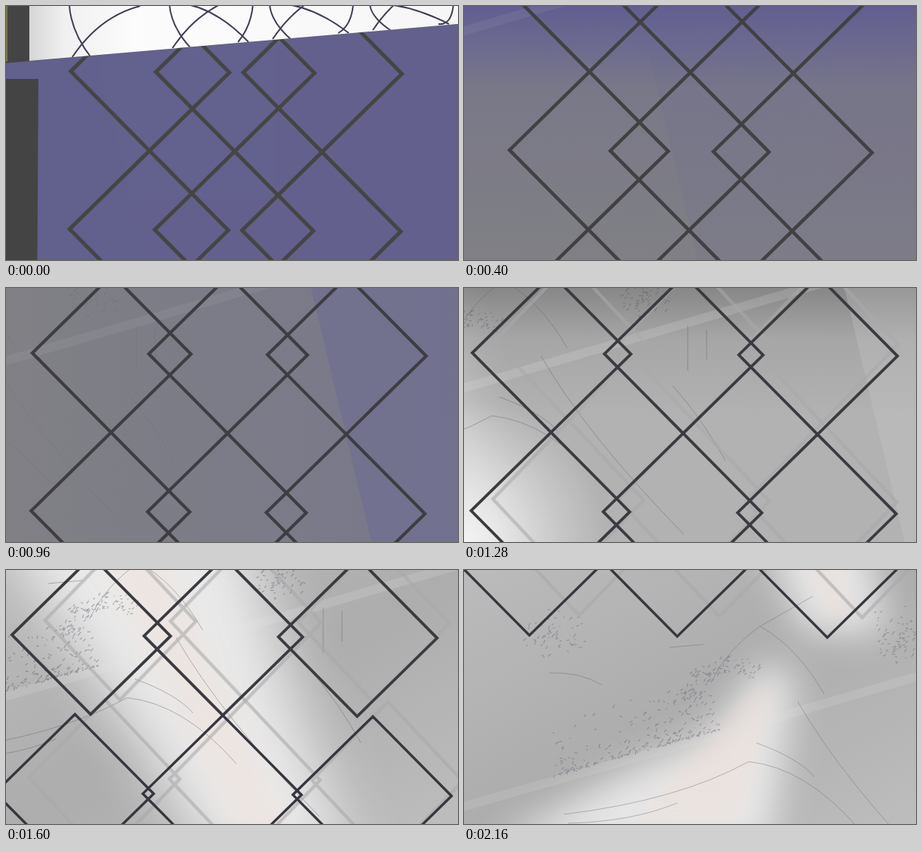
Recreate the animation shown at these times as an HTML page. Size 600x338 px, loop 2240 ms.

```html
<!DOCTYPE html>
<html lang="en">
<head>
<meta charset="utf-8">
<title>Lattice pan</title>
<style>
  html, body { margin: 0; width: 100%; height: 100%; overflow: hidden; background: #62608c; }
  svg { display: block; width: 100vw; height: 100vh; }
  path { fill: none; }

  /* 28 ticks of 80 ms; every motion holds still within a tick. */
  .pan, .ghost, .drift, .sink, .wedge, .tint, .beam, .bg {
    animation: 2240ms steps(28) -1ms infinite;
  }
  .pan { animation-name: pan; }
  .ghost { animation-name: ghost; }
  .drift { animation-name: drift; }
  .wedge { animation-name: wedge; }
  .tint { animation-name: tint; animation-timing-function: steps(4); }
  .sink { animation-name: sink; animation-timing-function: steps(4); }
  .beam { animation-name: beam; animation-timing-function: steps(4); }
  .dusk { animation-name: dusk; animation-timing-function: steps(5); }
  .haze { animation-name: haze; animation-timing-function: steps(7); }
  .dawn { animation-name: dawn; animation-timing-function: steps(4); }
  .day { animation-name: day; animation-timing-function: steps(4); }

  @keyframes pan { to { transform: translateY(-2940px); } }
  @keyframes ghost { from { transform: translate(-45px, 0); } to { transform: translate(60px, -28px); } }
  @keyframes drift { from { transform: translateX(-744px); } to { transform: translateX(124px); } }
  @keyframes wedge { from { transform: translateX(-300px); } to { transform: translateX(400px); } }
  @keyframes tint {
    0%, 17.857% { opacity: .15; animation-timing-function: steps(7); }
    42.857% { opacity: .4; fill: #6a6896; }
    57.142% { opacity: .25; fill: #cfcfcf; }
    71.428%, to { opacity: 0; fill: #cfcfcf; }
  }
  @keyframes sink {
    0%, 42.857% { opacity: .35; }
    57.142% { opacity: .9; }
    85.714% { transform: translateY(0); opacity: .9; animation-timing-function: steps(3); }
    96.428%, to { transform: translateY(85px); opacity: .8; }
  }
  @keyframes beam {
    0%, 42.857% { transform: translate(-860px, 0) scaleX(1.7); opacity: 0; }
    57.142% { transform: translate(-860px, 0) scaleX(1.7); opacity: .5; }
    71.428% { transform: translate(-475px, 0) scaleX(1.7); opacity: .85; }
    85.714% { transform: translate(0, 0) scaleX(1); opacity: .9; animation-timing-function: steps(3); }
    96.428%, to { transform: translate(15px, -290px) scaleX(1); opacity: .8; }
  }
  @keyframes dusk { 0% { opacity: 0; } 17.857%, to { opacity: 1; } }
  @keyframes haze { 0%, 17.857% { opacity: 0; } 42.857%, to { opacity: 1; } }
  @keyframes dawn { 0%, 42.857% { opacity: 0; } 57.142%, to { opacity: 1; } }
  @keyframes day { 0%, 57.142% { opacity: 0; } 71.428%, to { opacity: 1; } }
</style>
</head>
<body>
<svg viewBox="0 0 600 338" preserveAspectRatio="none">
  <defs>
    <linearGradient id="dusk" x2="0" y2="1">
      <stop offset="0" stop-color="#615e90"/>
      <stop offset=".15" stop-color="#6c6a8f"/>
      <stop offset=".32" stop-color="#797888"/>
      <stop offset="1" stop-color="#808085"/>
    </linearGradient>
    <linearGradient id="haze">
      <stop offset="0" stop-color="#808085"/>
      <stop offset="1" stop-color="#77778b"/>
    </linearGradient>
    <linearGradient id="dawn" x2="0" y2="1">
      <stop offset="0" stop-color="#878787"/>
      <stop offset=".2" stop-color="#a6a6a6"/>
      <stop offset=".5" stop-color="#b2b2b2"/>
    </linearGradient>
    <radialGradient id="corner" gradientUnits="userSpaceOnUse" cx="0" cy="338" r="190">
      <stop offset="0" stop-color="#f2f2f2"/>
      <stop offset="1" stop-color="#f2f2f2" stop-opacity="0"/>
    </radialGradient>
    <linearGradient id="day" x2="1" y2="1">
      <stop offset="0" stop-color="#bbb"/>
      <stop offset=".5" stop-color="#adadad"/>
      <stop offset="1" stop-color="#bdbdbd"/>
    </linearGradient>
    <linearGradient id="paper">
      <stop offset="0" stop-color="#d6d6d6"/>
      <stop offset=".08" stop-color="#f0f0f0"/>
      <stop offset=".25" stop-color="#fcfcfc"/>
      <stop offset="1" stop-color="#f6f6f6"/>
    </linearGradient>
    <filter id="soft" filterUnits="userSpaceOnUse" x="-500" y="-500" width="1800" height="1800">
      <feGaussianBlur stdDeviation="24"/>
    </filter>
    <filter id="mist" filterUnits="userSpaceOnUse" x="-500" y="-500" width="1800" height="1800">
      <feGaussianBlur stdDeviation="12"/>
    </filter>
    <clipPath id="sheet"><path d="M31-10H610V23L31 73Z"/></clipPath>
  </defs>

  <rect width="600" height="338" fill="#62608c"/>
  <rect class="bg dusk" width="600" height="338" fill="url(#dusk)"/>
  <rect class="bg haze" width="600" height="338" fill="url(#haze)"/>
  <g class="bg dawn">
    <rect width="600" height="338" fill="url(#dawn)"/>
    <rect width="600" height="338" fill="url(#corner)"/>
  </g>
  <rect class="bg day" width="600" height="338" fill="url(#day)"/>
  <g class="wedge">
    <polygon class="tint" fill="#6a6896" points="405,0 485,338 1100,338 1100,0"/>
  </g>

  <g class="beam">
    <g filter="url(#soft)" fill="#f4f4f4">
      <polygon points="225,-200 415,-200 475,0 545,375 435,375 295,0"/>
      <polygon points="390,405 425,440 390,660 20,660 190,565 310,510"/>
    </g>
    <g filter="url(#mist)" fill="#ffe4d6" opacity=".35">
      <polygon points="355,-20 400,-20 500,350 465,350"/>
      <polygon points="370,450 395,450 350,620 215,620"/>
    </g>
  </g>

  <g class="drift"><g class="sink">
    <path d="M-400 318L0 203L300 118L900-58" stroke="#e4e4e4" stroke-width="12" opacity=".2"/>
    <g id="marks" stroke="#65636f" opacity=".5">
      <path d="M40 240Q190 222 285 170Q360 178 430 258M45 252Q130 250 190 225"/>
      <path d="M235 65Q255 22 300-10Q350 18 385 80M300-10L370-50"/>
      <path d="M295 145Q350 165 372 190M350 90Q410 195 540 328M525 130Q565 175 595 230"/>
      <path d="M20 52Q60 50 90 68M180 18L225 14M545 50V110M570 55V95"/>
    </g>
  </g></g>

  <g class="pan">
    <g class="ghost">
      <g id="shade" transform="translate(303.5 194) rotate(.43) scale(.95 1)"></g>
    </g>
    <g id="gate" transform="translate(303.5 193.5) rotate(.43)"></g>
    <polygon points="0,-10 610,-10 610,23 0,76" fill="#444"/>
    <rect y="-10" width="2" height="84" fill="#77754a"/>
    <g clip-path="url(#sheet)">
      <rect x="31" y="-10" width="580" height="90" fill="url(#paper)"/>
      <g id="arcs" stroke="#3f3d52" stroke-width="2"></g>
    </g>
    <polygon points="0,97 43,97 41,440 0,440" fill="#444"/>
  </g>
</svg>

<script>
const $ = id => document.getElementById(id);

function draw(parent, d, stroke, width) {
  const path = document.createElementNS('http://www.w3.org/2000/svg', 'path');
  path.setAttribute('d', d);
  if (stroke) path.setAttribute('stroke', stroke);
  if (width) path.setAttribute('stroke-width', width);
  parent.append(path);
}

// Five sections, three columns of three diamonds; the columns spread downwards.
for (let i = 0; i < 5; i++) {
  const gap = 114.5 + 20.8 * i;
  let d = '';
  for (let n = 0; n < 9; n++) {
    const x = gap * (n % 3 - 1) + 1.5 * Math.abs(n % 3 - 1);
    const y = -420 + 630 * i + 210 * Math.floor(n / 3);
    d += `M${x} ${y}l105.3 105l-105.3 105l-105.3-105z`;
  }
  draw($('gate'), d, `hsl(245 ${2 * i}% ${27 - i}%)`, 5 - .4 * i);
  // The cast shadow has the tone of the wall, so it shows only where light falls.
  if (i > 2) draw($('shade'), d, 'rgb(168 168 168 / .6)', 4.5);
}

// Overlapping arches on the white sheet.
for (let i = 0; i < 4; i++) {
  const x = 84 + 133 * i, y = 72 - 12 * i;
  let d = `M${x} -2q2 ${y / 2} 30 ${y}M${x + 4} ${y - 4}q36 -54 90 -68`;
  if (i) d += `M${x + 11} -4q48 4 94 ${y - 8}M${x + 111} -4q-2 30 -20 ${y - 8}`;
  draw($('arcs'), d);
}

// Leaf scribbles: a bank thinning out upwards, an arch of leaves, two clumps.
let seed = 7;
const rnd = () => (seed = seed * 16807 % 2147483647) / 2147483647;
const spread = r => r * (rnd() + rnd() - 1);
function leaves(count, place) {
  let d = '';
  for (let n = 0; n < count; n++) {
    const [x, y] = place(rnd());
    d += `M${x.toFixed(1)} ${y.toFixed(1)}l${(1 + 3 * rnd()).toFixed(1)} ${(2 - 7 * rnd()).toFixed(1)}`;
  }
  draw($('marks'), d, '#56546a', 1.1);
}
leaves(230, u => [25 + 220 * u, 190 - 62 * u - 75 * rnd() ** 3]);
leaves(100, u => [265 - 62 * Math.cos(2 * u) + spread(16), 105 - 62 * Math.sin(2 * u) + spread(16)]);
leaves(60, () => [22 + spread(48), spread(36)]);
leaves(80, () => [485 + spread(42), 5 + spread(46)]);
</script>
</body>
</html>
```
